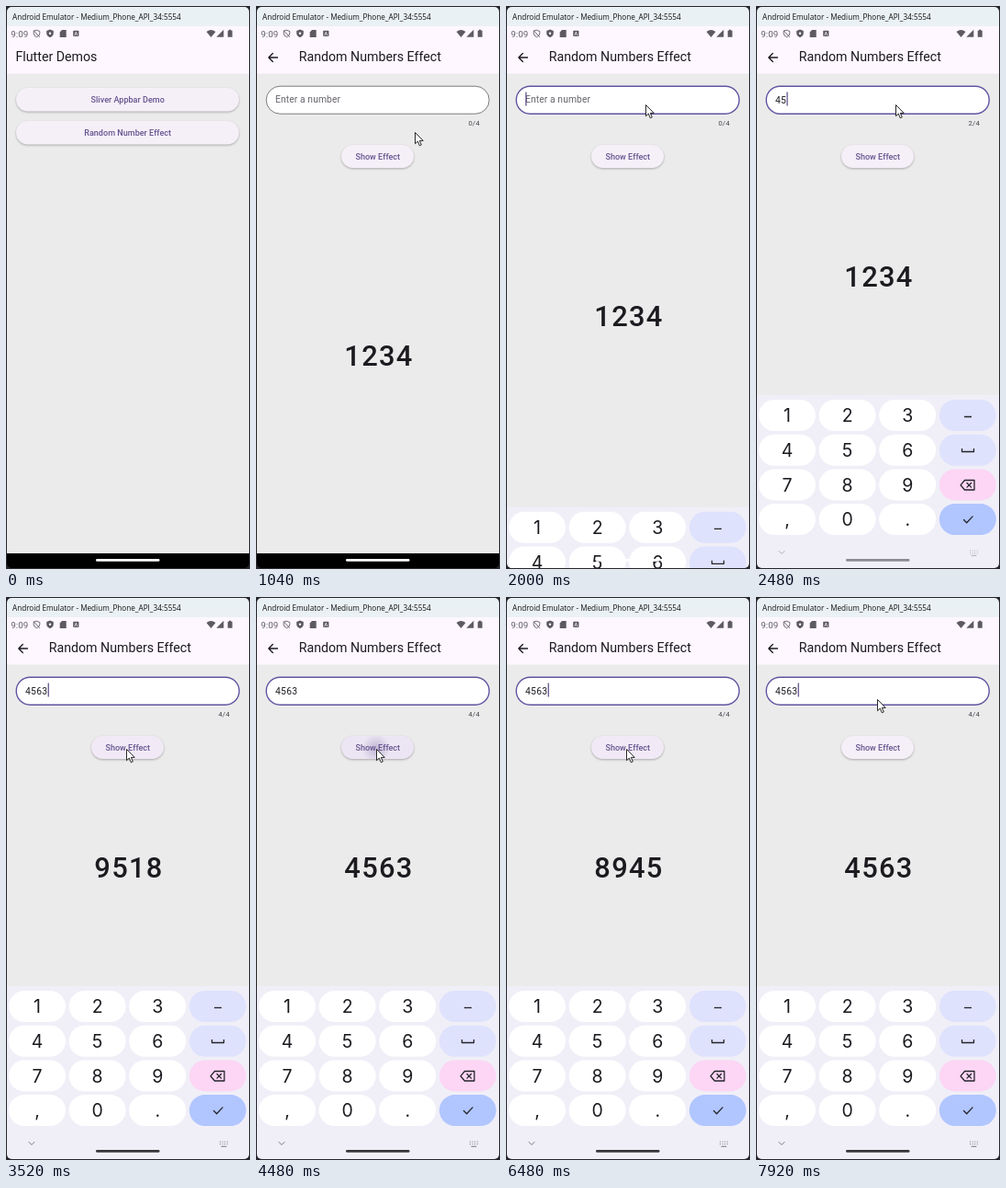
These frames come from a looping animation (266x612 px, 8 s). An HTML page:

```html
<!DOCTYPE html>
<html lang="en">
<head>
<meta charset="utf-8">
<title>Random numbers demo</title>
<style>
  html, body { margin: 0; width: 100%; height: 100%; overflow: hidden; background: #25252b; }
  svg { display: block; width: 266px; height: 612px; }
  text { font-family: Roboto, sans-serif; fill: #1d1b20; }
  .mid { text-anchor: middle; }
  .title { font-size: 14.2px; }
  .label { font-size: 9.02px; font-weight: 500; fill: #65558f; text-anchor: middle; letter-spacing: .03px; }
  .pill { fill: #f5eff8; filter: drop-shadow(0 1px .8px rgba(0, 0, 0, .28)); }
  .line { fill: none; stroke-linecap: round; stroke-linejoin: round; }
  #keys text { font: 19.5px Inter, sans-serif; text-anchor: middle; }
</style>
</head>
<body>
<svg viewBox="0 0 266 612">
  <defs>
    <clipPath id="window"><rect x="1" y="1" width="264" height="610" rx="5"/></clipPath>
    <clipPath id="body"><rect x="1" y="22" width="264" height="573"/></clipPath>
    <clipPath id="effectClip"><rect x="93" y="151" width="79" height="25" rx="12.5"/></clipPath>
    <radialGradient id="ink">
      <stop offset="0" stop-color="#65558f" stop-opacity=".32"/>
      <stop offset="1" stop-color="#65558f" stop-opacity="0"/>
    </radialGradient>
  </defs>
  <g clip-path="url(#window)">
    <rect width="266" height="612" fill="#000"/>

    <g clip-path="url(#body)">
      <g id="home">
        <rect y="22" width="266" height="573" fill="#ebebeb"/>
        <rect y="22" width="266" height="51.5" fill="#fef7ff"/>
        <text class="title" x="10.5" y="60">Flutter Demos</text>
        <rect class="pill" x="11" y="89" width="243" height="25.5" rx="12.7"/>
        <rect id="homePill" class="pill" x="11" y="125" width="243" height="25.5" rx="12.7"/>
        <text class="label" x="132.7" y="105">Sliver Appbar Demo</text>
        <text class="label" x="132.7" y="141">Random Number Effect</text>
      </g>

      <g id="page">
        <rect y="22" width="266" height="573" fill="#ebebeb"/>
        <rect y="22" width="266" height="51.5" fill="#fef7ff"/>
        <path class="line" d="M23.5 56H14M18.3 51.5L13.8 56l4.5 4.5" stroke="#1d1b20" stroke-width="1.3"/>
        <text class="title" x="46.7" y="60">Random Numbers Effect</text>
        <rect id="field" x="11.2" y="87.2" width="243" height="30" rx="15" fill="#fff"/>
        <text id="hint" x="21" y="105.3" font-size="10.3" letter-spacing=".1" fill="#68646d" style="fill:#68646d">Enter a number</text>
        <text id="typed" x="21" y="105.7" font-size="10.3" letter-spacing=".32"></text>
        <rect id="caret" y="93.5" width="1.3" height="15" fill="#65558f"/>
        <text id="count" x="244" y="130" font-size="7.7" letter-spacing=".2" text-anchor="end" style="fill:#49454f"></text>
        <rect id="effectPill" class="pill" x="93" y="151" width="79" height="25" rx="12.5"/>
        <circle id="ripple" cx="131" cy="165" fill="url(#ink)" clip-path="url(#effectClip)"/>
        <text class="label" x="132.8" y="167">Show Effect</text>
        <text id="number" class="mid" x="134" font-size="30.9" font-weight="500" letter-spacing="1.3"></text>
      </g>
    </g>

    <g id="keyboard">
      <rect y="423" width="266" height="189" fill="#f0eff8"/>
      <g id="keys"></g>
      <g class="line" stroke="#25252c" stroke-width="1.3">
        <path d="M227 446.5h8" stroke-linecap="butt"/>
        <path d="M224.5 481v3.5h13V481" stroke-linecap="butt"/>
        <path d="M227.5 515.5h10.5v10.5h-10.5l-4.5-5.2zM230 518.5l4.6 4.6M234.6 518.5l-4.6 4.6"/>
        <path d="M226.5 558.5l3.2 3.2 6.4-6.8"/>
      </g>
      <g id="tools" class="line" stroke="#77777f">
        <path d="M25 592.5l3 3 3-3"/>
        <path d="M233 592.2h9M233 594.7h9" stroke-dasharray="1 1.6" stroke-linecap="butt"/>
        <path d="M235 597.3h5"/>
      </g>
    </g>
    <rect id="handle" x="98" y="601" width="69.5" height="2.8" rx="1.4"/>

    <rect width="266" height="22" fill="#eaf1f4"/>
    <text x="7" y="14.5" font-size="8.17" style="font-family:'Open Sans',sans-serif;fill:#111">Android Emulator - Medium_Phone_API_34:5554</text>
    <g fill="#5d5a61">
      <text x="5.3" y="33.5" font-size="9.8" style="fill:#625f66">9:09</text>
      <path class="line" d="M33.5 26.3l3.3 1.2v2.3q0 2.6-3.3 4-3.3-1.4-3.3-4v-2.3zM30.5 27l6 6.5" stroke="#5d5a61" stroke-width=".9"/>
      <path d="M48 25.5l3.8 1.4v2.6q0 3-3.8 4.8-3.8-1.8-3.8-4.8v-2.6z"/>
      <circle cx="48" cy="29.8" r="1.2" fill="#fef7ff"/>
      <path d="M61 26h4.7v8h-7v-5.6z"/>
      <rect x="73.2" y="26.7" width="6.2" height="6.4" rx=".8"/>
      <path class="line" d="M75 31.8l1.3-3.6 1.3 3.6" stroke="#fef7ff" stroke-width=".8"/>
      <path d="M218.5 28q5-3.8 10 0l-5 6z"/>
      <path d="M237.3 25.8v8h-8z"/>
      <path d="M243 25.8h2.4v.9h1.3v7.1h-5v-7.1h1.3z"/>
    </g>
  </g>
  <path id="mouse" d="M0 0v12.2l2.8-2.6 2 4.7 2-.9-2-4.5h3.9z" fill="#fff" stroke="#111" stroke-width=".9"/>
</svg>
<script>
const LOOP = 8000, STEP = 80;
const el = Object.fromEntries([...document.querySelectorAll('[id]')].map(n => [n.id, n]));
const set = (node, attrs) => { for (const k in attrs) node.setAttribute(k, attrs[k]); };
const ease = u => (u = Math.min(1, Math.max(0, u)), u * u * (3 - 2 * u));

// Keypad: four rows of three white keys and one coloured key
const sideColors = ['#dfe2fc', '#dfe2fc', '#fcd6f4', '#b1c6ff'];
['123', '456', '789', ',0.'].forEach((row, r) => {
  const y = 428 + r * 37.7;
  [...row, ''].forEach((char, c) => {
    const x = 3 + c * 65.6;
    el.keys.innerHTML += `<rect x="${x}" y="${y}" width="62" height="34" rx="17" fill="${c < 3 ? '#fff' : sideColors[r]}"/>
      <text x="${x + 31}" y="${y + 24.3}">${char}</text>`;
  });
});

const mousePath = [
  [400, 104, 9], [480, 150, 90], [560, 171, 161], [640, 171, 161], [720, 173, 137],
  [1120, 173, 137], [1440, 152, 107], [2720, 152, 107], [2960, 131, 165],
  [7280, 131, 165], [7440, 146, 120], [7520, 131, 110], [7600, 131, 110], [7680, 132, 111]
];
const typing = [2320, 2400, 2560, 2720];
const presses = [3040, 4480, 5760];
const blinks = [1760, 4240, 4640, 5040, 5520, 5920, 6320, 6720, 7120, 7440, 7920];

function mouseAt(t) {
  const i = mousePath.findIndex(p => p[0] > t);
  if (i < 0) return mousePath.at(-1).slice(1);
  const [t0, x0, y0] = mousePath[i - 1], [t1, x1, y1] = mousePath[i];
  const u = (t - t0) / (t1 - t0);
  return [x0 + (x1 - x0) * u, y0 + (y1 - y0) * u];
}

// Digits flicker after a press and settle from right to left
function numberAt(t, sincePress) {
  if (t < presses[0] + 160) return '1234';
  return [...'4563'].map((digit, i) => {
    if (sincePress < 160 || sincePress >= 1040 - i * 80) return digit;
    const noise = Math.sin(t / STEP * 12.99 + i * 78.23) * 43758.5;
    return Math.floor((noise - Math.floor(noise)) * 10);
  }).join('');
}

function draw(t) {
  const open = ease((t - 760) / 280);
  const scale = .85 + .15 * open;
  set(el.page, { opacity: open, transform: `translate(133 308) scale(${scale}) translate(-133 -308)` });
  el.homePill.style.fill = t >= 720 ? '#e6ddf0' : t >= 560 ? '#eee7f4' : '';

  const focused = t >= 1680;
  set(el.field, { stroke: focused ? '#6253a0' : '#5f5b64', 'stroke-width': focused ? 1.4 : .8 });
  const length = typing.filter(at => t >= at).length;
  el.typed.textContent = '4563'.slice(0, length);
  el.hint.style.display = length ? 'none' : '';
  el.count.textContent = length + '/4';
  const caretOn = blinks.filter(at => t >= at).length % 2;
  set(el.caret, { x: 21.2 + length * 6.1, opacity: caretOn });

  const press = presses.findLast(at => t >= at);
  const sincePress = press === undefined ? Infinity : t - press;
  set(el.number, { y: 391 - 86.5 * ease((t - 1850) / 300) });
  el.number.textContent = numberAt(t, sincePress);
  const hover = t >= 2960 && t < 7360;
  el.effectPill.style.fill = hover ? (sincePress < 240 ? '#ece6f4' : '#f1eaf6') : '';
  set(el.ripple, {
    r: 16 + Math.min(sincePress, 400) / 8,
    opacity: Math.max(0, 1 - sincePress / 400)
  });

  const rise = ease((t - 1880) / 300);
  set(el.keyboard, { transform: `translate(0 ${188 * (1 - rise)})` });
  set(el.tools, { opacity: t < 2800 ? .55 : 1 });
  set(el.handle, { fill: rise < .5 ? '#fff' : t < 2800 ? '#8b8b91' : '#36363b' });

  const shown = t >= mousePath[0][0];
  set(el.mouse, { opacity: +shown });
  if (shown) set(el.mouse, { transform: `translate(${mouseAt(t).map(v => v + .5)})` });
}

function tick() {
  const t = performance.now() % LOOP;
  draw(Math.floor(t / STEP) * STEP);
  requestAnimationFrame(tick);
}
tick();
</script>
</body>
</html>
```
